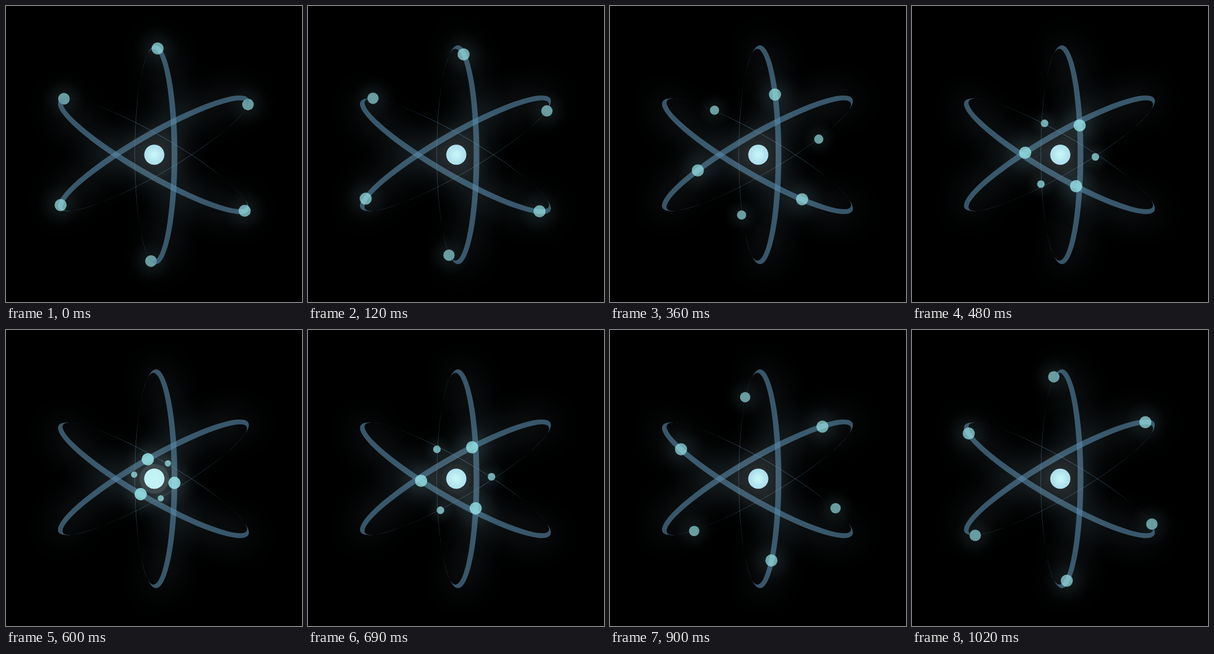
An HTML page with a canvas for the animation above (1.05 s loop, 500x500 px).

```html
<!DOCTYPE html>
<html lang="en">
<head>
<meta charset="utf-8">
<title>Atom</title>
<style>
html, body { margin: 0; width: 100%; height: 100%; overflow: hidden; background: #000; }
canvas { display: block; width: 500px; height: 500px; }
</style>
</head>
<body>
<canvas id="stage" width="500" height="500"></canvas>
<script>
const TAU = Math.PI * 2;
const LOOP = 1050, STEP = 30;
const CX = 250.5, CY = 251.3;
const RX = 34, RY = 182;
const TILTS = [0, TAU / 3, 2 * TAU / 3];

// time, orbit angle, angular speed
const KEYS = [
  [0, 0.165, 0.0014],
  [240, 0.65, 0.0026],
  [360, 0.978, 0.0027],
  [480, 1.295, 0.00262],
  [600, 1.609, 0.00263],
  [780, 2.09, 0.0027],
  [1020, 2.813, 0.0034]
];

const ctx = document.getElementById('stage').getContext('2d');

function layer(paint) {
  const c = document.createElement('canvas');
  c.width = c.height = 500;
  paint(c.getContext('2d'));
  return c;
}

function disc(g, x, y, r, fill) {
  g.fillStyle = fill;
  g.beginPath();
  g.arc(x, y, r, 0, TAU);
  g.fill();
}

function softDisc(g, x, y, r, rgb, alpha) {
  const grad = g.createRadialGradient(x, y, 0, x, y, r);
  for (let i = 0; i <= 6; i++) {
    const u = i / 6;
    const a = alpha * (1 - u * u) ** 2;
    grad.addColorStop(u, `rgba(${rgb},${a})`);
  }
  disc(g, x, y, r, grad);
}

// a band between two shifted ellipses: heavy in front, hairline behind
function ring(g, tilt) {
  g.save();
  g.translate(CX, CY);
  g.rotate(tilt);
  g.beginPath();
  g.ellipse(2.9, 0, 36.1, 185, 0, 0, TAU);
  g.closePath();
  g.moveTo(29, 0);
  g.ellipse(-1.6, 0, 30.9, 179, 0, 0, TAU);
  g.fill('evenodd');
  g.restore();
}

const glow = layer(g => {
  g.shadowOffsetX = 1000;
  g.shadowColor = 'rgba(125,160,178,0.55)';
  g.shadowBlur = 52;
  g.translate(-1000, 0);
  TILTS.forEach(a => ring(g, a));
});

const rings = layer(g => {
  g.fillStyle = 'rgba(91,139,170,0.6)';
  TILTS.forEach(a => ring(g, a));
});

function angleAt(t) {
  let i = 0;
  while (i < KEYS.length - 2 && t > KEYS[i + 1][0]) i++;
  const [t0, a, va] = KEYS[i], [t1, b, vb] = KEYS[i + 1];
  const h = t1 - t0, u = (t - t0) / h, u2 = u * u, u3 = u2 * u;
  return a * (2 * u3 - 3 * u2 + 1) + b * (3 * u2 - 2 * u3)
    + h * va * (u3 - 2 * u2 + u) + h * vb * (u3 - u2);
}

function electron(tilt, angle, front) {
  const px = RX * Math.sin(angle), py = -RY * Math.cos(angle);
  const c = Math.cos(tilt), s = Math.sin(tilt);
  const x = CX + px * c - py * s, y = CY + px * s + py * c;
  const far = Math.abs(py) / RY;
  const r = front ? 10.4 - 0.2 * far : 5.1 + 4.8 * far;
  const near = Math.exp(-((py / 65) ** 2));
  const alpha = (front ? 0.71 : 0.66) + 0.15 * near;
  softDisc(ctx, x, y, r * 4, '110,160,170', 0.11);
  disc(ctx, x, y, r, `rgba(152,228,232,${alpha})`);
}

function core(pulse) {
  softDisc(ctx, CX, CY, 62, '150,160,165', 0.2);
  disc(ctx, CX, CY, 25, `rgba(150,165,172,${0.2 * pulse})`);
  disc(ctx, CX, CY, 17, '#b0e0ed');
  softDisc(ctx, CX, CY, 15, '200,248,248', 0.9);
  disc(ctx, CX, CY, 17, `rgba(198,246,248,${pulse})`);
}

function draw(t) {
  const a = angleAt(t);
  ctx.fillStyle = '#000';
  ctx.fillRect(0, 0, 500, 500);
  ctx.drawImage(glow, 0, 0);
  TILTS.forEach(tilt => electron(tilt, a + Math.PI, false));
  ctx.drawImage(rings, 0, 0);
  core(Math.exp(-(((t - 600) / 65) ** 2)));
  TILTS.forEach(tilt => electron(tilt, a, true));
}

const start = performance.now();
function tick() {
  const t = (performance.now() - start) % LOOP;
  draw(Math.floor(t / STEP) * STEP);
  requestAnimationFrame(tick);
}
tick();
</script>
</body>
</html>
```
